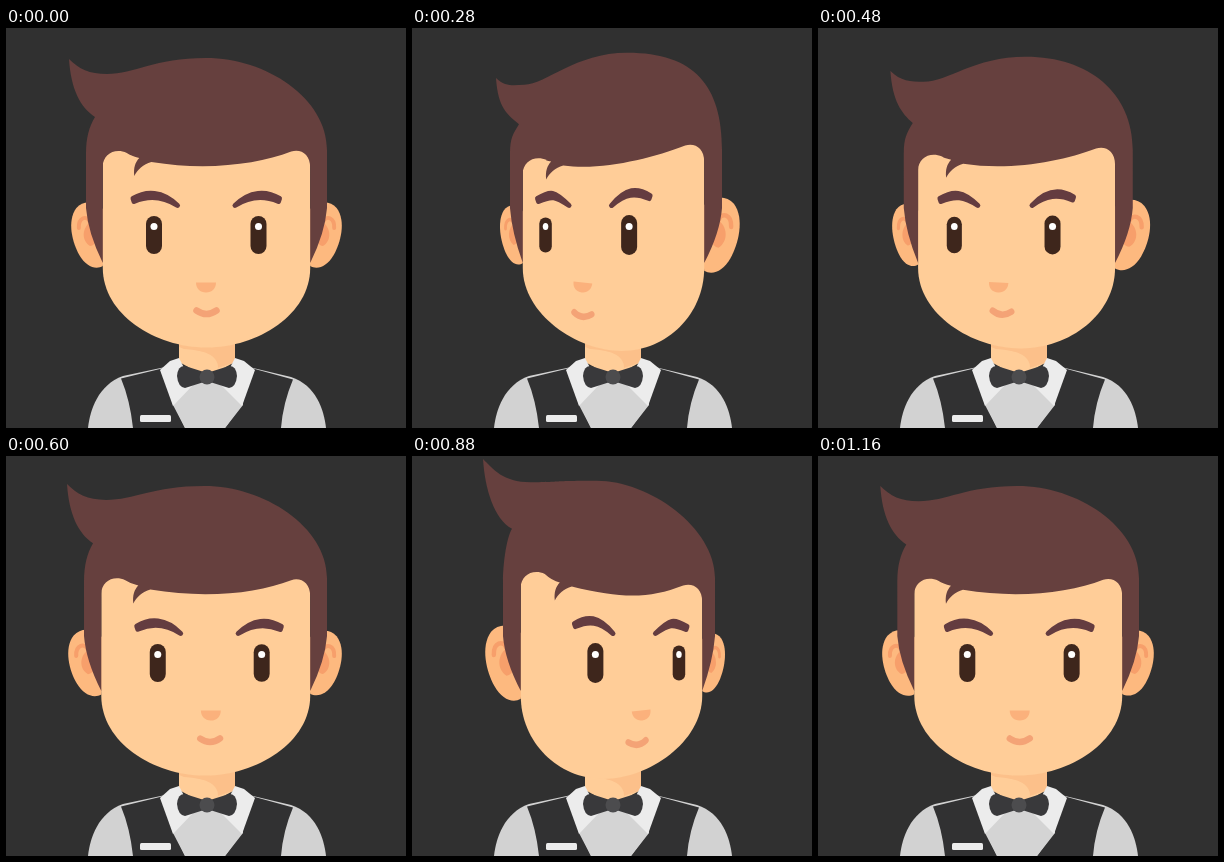
Write an HTML page with a canvas that moves like this. It is 400 px wide and 400 px high and loops after 1200 ms.

```html
<!DOCTYPE html>
<html>
<head>
<meta charset="utf-8">
<title>Waiter looking around</title>
<style>
html, body { margin: 0; height: 100%; overflow: hidden; background: #303030; }
canvas { display: block; width: 100vw; height: 100vh; }
</style>
</head>
<body>
<canvas width="400" height="400"></canvas>
<script>
const ctx = document.querySelector('canvas').getContext('2d');
const SKIN = '#ffcd98', HAIR = '#66403e', BROW = '#643c40', SHADE = '#f79f6b';

function fill(d, color) {
  ctx.fillStyle = color;
  ctx.fill(new Path2D(d));
}
function line(d, color, width) {
  ctx.strokeStyle = color;
  ctx.lineWidth = width;
  ctx.lineCap = ctx.lineJoin = 'round';
  ctx.stroke(new Path2D(d));
}
function at(x, y, draw, sx = 1, sy = 1, angle = 0) {
  ctx.save();
  ctx.translate(x, y);
  ctx.rotate(angle);
  ctx.scale(sx, sy);
  draw();
  ctx.restore();
}
// piecewise linear curve through (xs, ys)
function curve(v, xs, ys) {
  let i = 1;
  while (i < xs.length - 1 && v > xs[i]) i++;
  return ys[i - 1] + (ys[i] - ys[i - 1]) * (v - xs[i - 1]) / (xs[i] - xs[i - 1]);
}

// head turn: negative looks left, positive looks right
const KEYS = [[0, 0], [285, -1.18], [875, 1.18], [1200, 0]];
function turn(t) {
  const i = KEYS.findIndex(k => k[0] > t);
  const [t0, a] = KEYS[i - 1], [t1, b] = KEYS[i];
  return a + (b - a) * (1 - Math.cos(Math.PI * (t - t0) / (t1 - t0))) / 2;
}

// inward movement of each outline on the side turned away (far) or shown (near)
const AMOUNT = [0, .126, .7, .8, .967, 1.18];
const INSET = {
  face: { far: [0, 0, 4, 6, 11.5, 14], near: [0, -1.5, 9, 11.5, 11.5, 12] },
  hair: { far: [0, 0, 7, 10, 15.5, 18], near: [0, -2, 8, 10, 10.5, 11] },
  ear: { far: [0, 0, 11, 13, 19.5, 23], near: [0, -3, 5, 8, 7.5, 8] }
};
const TIP_U = [-1.18, -.967, -.7, 0, .126, .25, .8, .967, 1.18];
const TIP_X = [84, 82, 74, 63, 61, 59, 71, 70, 71];
const TIP_Y = [50, 48, 45, 31, 28, 24, 12, 8, 3];

function body() {
  fill('M82 400C84 382 92 357 117 348L157 339.5H245L285 349C310 357 318 382 320 400Z', '#d2d2d2');
  fill('M115 350.5L156 340.5L168 377L179 400H127Q124 372 115 350.5Z', '#313132');
  fill('M287 351.5L247 340.5L236 377L219 400H275Q277 375 287 351.5Z', '#313132');
  fill('M165 340H238L237 377L219 400H179L167 377Z', '#d4d4d4');
  fill('M173 312H229V334L201 349L173 334Z', SKIN);
  fill('M173 312H229V334L212 340Q213 323 178 321L173 319Z', '#fcc08a');
  fill('M173 330L164 333L154 342L167 378L187 357Z', '#ececec');
  fill('M229 330L238 333L249 342L236 378L215 357Z', '#ececec');
  fill('M198 344L179 338Q172 337 171 348Q172 359 179 360L198 354Z', '#39393b');
  fill('M204 344L223 338Q230 337 231 348Q230 359 223 360L204 354Z', '#39393b');
  ctx.beginPath();
  ctx.arc(201, 349, 7.5, 0, 7);
  ctx.fillStyle = '#4c4c4e';
  ctx.fill();
  ctx.beginPath();
  ctx.roundRect(134, 387, 31, 7, 1.5);
  ctx.fillStyle = '#ececec';
  ctx.fill();
}

function ear() {
  fill('M38 -20C30 -33 15 -37 6 -27C-4 -14 2 8 9 20C16 32 26 35 33 31Z', '#fdb97f');
  fill('M22 -14C11 -8 11 6 20 11C29 10 30 -6 22 -14Z', SHADE);
  line('M8.5 -7C8 -18 17 -20 20 -13', SHADE, 4);
}

// eye and brow, drawn for the left side of the head
function eye(near, m) {
  const dx = near ? 30 * m : -27 * m + 12.5 * m * m;
  const x = 148 + dx;
  const w = near ? 16 : 16 - 2.5 * m * m;
  const h = near ? 38 + 1.5 * m : 38 - 2.5 * m;
  ctx.beginPath();
  ctx.roundRect(x - w / 2, 207 - h / 2, w, h, w / 2);
  ctx.fillStyle = '#3e261c';
  ctx.fill();
  ctx.beginPath();
  ctx.ellipse(x, 198.5, w * .22, 3.6, 0, 0, 7);
  ctx.fillStyle = '#fff';
  ctx.fill();
  const out = x - 21 + (near ? 0 : 11 * m);
  const inn = x + 23.5 - (near ? 5 * m : 0);
  const y = near ? 170.5 - 2.5 * m : 170.5;
  const brow = `M${out} ${y}C${out + 13} ${y - 8} ${inn - 15} ${y - 8} ${inn} 177.5
    C${inn - 14} ${y - 2} ${out + 15} ${y - 3} ${out + 1} ${y + 3}Z`;
  fill(brow, BROW);
  line(brow, BROW, 5);
}

function head(u) {
  const m = Math.abs(u), u2 = u * u;
  const edge = (part, x, left) =>
    x + (left ? 1 : -1) * curve(m, AMOUNT, INSET[part][left === u > 0 ? 'near' : 'far']);
  const L = edge('face', 96.8, true), R = edge('face', 304.2, false);
  const hl = edge('hair', 80, true), hr = edge('hair', 321, false);
  const el = edge('ear', 64.5, true), er = edge('ear', 336.5, false);

  const tall = near => near ? 1 + .13 * m : 1 - .08 * m;
  at(el, 207, ear, (L - el) / 33, tall(u > 0));
  at(er, 207, ear, (R - er) / 33, tall(u < 0));

  const mid = (L + R) / 2, chin = 319.5 + 2.5 * u2, k = (R - L) * .25;
  const cx = mid - 7 * u;
  fill(`M${L} 110H${R}V240C${R} 286 ${cx + k} ${chin} ${cx} ${chin}
    C${cx - k} ${chin} ${L} 286 ${L} 240Z`, SKIN);

  const tx = curve(u, TIP_U, TIP_X), ty = curve(u, TIP_U, TIP_Y);
  const nx = hl + 9, ny = ty + 58 + 10 * u;
  const top = 200 - 13 * u, topY = 30 - 3.7 * u2;
  const wx = tx + 38 + 8 * u, wy = ty + 15 + 7 * u;
  const ly = 122.5 - 6 * u, ry = 122.5 + 5 * u;
  const fx = L + 31.5 + 4.5 * u - 2 * u2, fy = 148 - 3 * u;
  fill(`M${tx} ${ty}C${tx + 10} ${ty + 10} ${tx + 20} ${wy} ${wx} ${wy}
    C${wx + 28 + 6 * u} ${wy} ${top - 52} ${topY} ${top} ${topY}
    C${top + 60 - 6 * u} ${topY} ${hr} ${topY + 40 + 6 * u} ${hr} 122
    V180Q${hr - 2} 205 ${R} 235V${ry + 17}
    C${R} ${ry + 4} ${R - 9} ${ry - 2} ${R - 19} ${ry + 1}
    C${R - 53} ${ry + 14} ${mid + 10 * u} 143 ${fx + 17} ${fy - 14}
    C${fx + 9} ${fy - 12} ${fx + 3} ${fy - 6} ${fx} ${fy}
    C${fx - 1} ${fy - 8} ${fx + 1} ${fy - 14} ${fx + 5} ${fy - 18}
    Q${fx - 3} ${fy - 20} ${L + 24} ${ly + 2.5}
    C${L + 12} ${ly - 3} ${L} ${ly + 4} ${L} ${ly + 16}
    V235Q${hl + 2} 205 ${hl} 180V125
    C${hl} 110 ${hl + 3} ${ny + 10} ${nx} ${ny}
    C${tx + 11} ${ny - 10} ${tx + 2} ${ty + 30} ${tx} ${ty}Z`, HAIR);

  eye(u > 0, m);
  at(400.5, 0, () => eye(u < 0, m), -1);
  const tilt = -.1 * u;
  at(200 + 40 * u - 13 * u * m, 254.5,
    () => fill('M-10 0H10C10 6 6 10 0 10C-6 10 -10 6 -10 0Z', '#fbb17c'), 1 - .05 * m, 1, tilt);
  at(200.5 + 30 * u - 6 * u * m - 1.8 * u2, 282 + 2 * u2,
    () => line('M-10 0.5Q0 7.5 10 0.5', '#f4a376', 6.5), 1 - .1 * m, 1, tilt);
}

function frame(now) {
  const t = Math.floor(now % 1200 / 40) * 40;
  ctx.fillStyle = '#303030';
  ctx.fillRect(0, 0, 400, 400);
  body();
  head(turn(t));
  requestAnimationFrame(frame);
}
frame(0);
</script>
</body>
</html>
```
